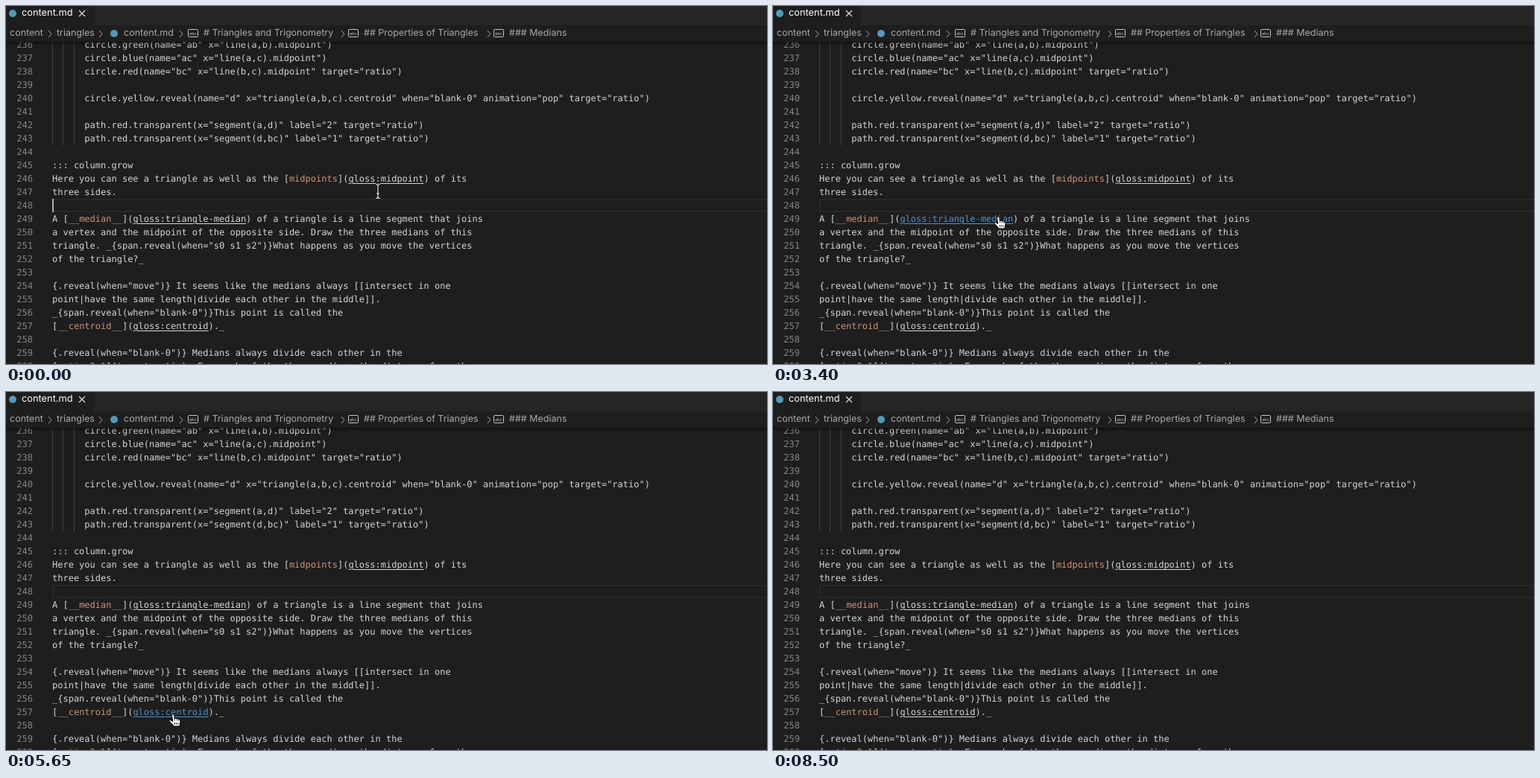
An HTML page for the animation above (8.92 s loop, 1021x481 px).

```html
<!DOCTYPE html>
<html lang="en">
<head>
<meta charset="utf-8">
<title>Glossary hover</title>
<style>
  html, body { margin: 0; width: 100%; height: 100%; overflow: hidden; background: #1e1e1e; }
  #stage { position: relative; width: 1021px; height: 481px; overflow: hidden; background: #1e1e1e;
    text-rendering: geometricPrecision; }
  #stage * { position: absolute; white-space: pre; }
  #stage span, #stage i, #stage u, #stage b { position: static; font-style: normal; font-weight: 400; }
  #tabs { left: 118px; top: 0; right: 0; height: 26px; background: #252526; }
  .ui { font: 12.5px/20px Inter, sans-serif; color: #a9a9a9; }
  .tab { color: #fff; font-size: 12.8px; }
  .dot { width: 10px; height: 10px; border-radius: 50%; background: #519aba; }
  #editor { left: 0; top: 48px; width: 1021px; height: 433px; overflow: hidden; }
  #shadow { inset: 0; box-shadow: #000 0 6px 6px -6px inset; }
  .code { font: 12px/18px "DejaVu Sans Mono", monospace; color: #d4d4d4; }
  .num { left: 0; width: 36px; text-align: right; color: #858585; }
  .line { left: 62px; }
  .guide { top: 0; width: 1px; height: 139px; background: #404040; }
  #active { left: 62px; top: 211px; width: 970px; height: 14px; border: 2px solid #282828; }
  #caret { left: 62px; top: 211px; width: 2px; height: 18px; background: #aeafad; }
  #stage i { color: #ce9178; }
  u { text-decoration-thickness: 1px; text-underline-offset: 2px; }
  .popup { box-sizing: border-box; height: 181px; background: #252526; border: 1px solid #454545; }
  #stage .popup > div { position: static; padding: 0 8px; }
  #stage .popup .head { font: 11.7px/26px Inter, sans-serif; color: #ccc; border-bottom: 1px solid #3f3f40; }
  #stage .popup .code { padding: 4px 8px; }
  .head span { color: #3794ff; }
  .popup b { color: #569cd6; }
  .popup .note { color: #6a9955; }
  svg { left: 0; top: 0; width: 1021px; height: 481px; }
</style>
</head>
<body>
<div id="stage">
  <div id="tabs"></div>
  <div id="editor"></div>
  <svg id="icons" fill="none" stroke="#a9a9a9"></svg>
  <div id="popups"></div>
  <svg id="pointer">
    <g id="beam">
      <path d="M-3 -8.5Q0 -8.5 0 -6V8Q0 10.5 -3 10.5M3 -8.5Q0 -8.5 0 -6V8Q0 10.5 3 10.5M-2 4H2"
        fill="none" stroke="#111" stroke-width="3"/>
      <path d="M-3 -8.5Q0 -8.5 0 -6V8Q0 10.5 -3 10.5M3 -8.5Q0 -8.5 0 -6V8Q0 10.5 3 10.5M-2 4H2"
        fill="none" stroke="#eee" stroke-width="1.2"/>
    </g>
    <g id="arrow">
      <path d="M0 0V14.5L3.3 11.4L5.6 16.7L8 15.7L5.8 10.5H10.4Z" fill="#000" stroke="#fff"/>
    </g>
    <g id="hand" stroke="#000" stroke-linejoin="round">
      <path d="M-1.5 1.2C-1.5 -.6 1.4 -.6 1.6 1.2L2.4 6C3 5 5 5 5.2 6.3C6 5.6 7.4 5.8 7.7 7C9 6.6 10 7.4 10 9C10 11 9 12.5 9 16H1C0 14 -2 12.5 -4.6 9.6C-5.4 8 -3.5 7 -2 8.5L-.3 9.8Z" fill="#fff"/>
      <path d="M2.4 11V14M4.6 11V14M6.8 11V14M2.4 6V8.5M5.2 6.5V8.5M7.7 7V9" fill="none" stroke-width=".8"/>
    </g>
  </svg>
</div>
<script>
const LOOP = 8920;
const ROW = 18;
const $ = id => document.getElementById(id);

function add(parent, className, html, style = {}) {
  const node = document.createElement('div');
  node.className = className;
  node.innerHTML = html;
  for (const key in style) node.style[key] = style[key] + 'px';
  parent.append(node);
  return node;
}

// Tab and breadcrumbs
const stage = $('stage');
const label = (text, left, centre, extra = '') =>
  stage.insertBefore(add(stage, 'ui ' + extra, text, { left, top: centre - 10 }), $('icons'));
const dot = (x, y) => stage.insertBefore(add(stage, 'dot', '', { left: x - 5, top: y - 5 }), $('icons'));

label('content.md', 21, 10, 'tab');
dot(9, 10);
dot(145, 37);
[['content', 5], ['triangles', 68], ['content.md', 158], ['# Triangles and Trigonometry', 265],
 ['## Properties of Triangles', 480], ['### Medians', 675]].forEach(([text, x]) => label(text, x, 37));

const chevrons = [57, 125, 233, 450, 646].map(x => `<path d="M${x} 33l4 4.5l-4 4.5"/>`);
const symbols = [251, 466, 661].map(x =>
  `<rect x="${x - 6.5}" y="31.5" width="13" height="10" rx="1" stroke="#c5c5c5"/>
   <text x="${x}" y="38.6" font-family="Inter, sans-serif" font-size="5.6" text-anchor="middle"
     fill="#c5c5c5" stroke="none">abc</text>`);
$('icons').innerHTML = chevrons.join('') + symbols.join('') +
  '<path d="M98 6l8 8M106 6l-8 8" stroke="#ddd" stroke-width="1.2"/>';

// Editor
const source = `      circle.green(name="ab" x="line(a,b).midpoint")
      circle.blue(name="ac" x="line(a,c).midpoint")
      circle.red(name="bc" x="line(b,c).midpoint" target="ratio")

      circle.yellow.reveal(name="d" x="triangle(a,b,c).centroid" when="blank-0" animation="pop" target="ratio")

      path.red.transparent(x="segment(a,d)" label="2" target="ratio")
      path.red.transparent(x="segment(d,bc)" label="1" target="ratio")

::: column.grow
Here you can see a triangle as well as the [midpoints](gloss:midpoint) of its
three sides.

A [__median__](gloss:triangle-median) of a triangle is a line segment that joins
a vertex and the midpoint of the opposite side. Draw the three medians of this
triangle. _{span.reveal(when="s0 s1 s2")}What happens as you move the vertices
of the triangle?_

{.reveal(when="move")} It seems like the medians always [[intersect in one
point|have the same length|divide each other in the middle]].
_{span.reveal(when="blank-0")}This point is called the
[__centroid__](gloss:centroid)._

{.reveal(when="blank-0")} Medians always divide each other in the
[ratio 2:1](target:ratio). For each of the three medians the distance from the`;

const editor = $('editor');
add(editor, '', '').id = 'active';
[62, 76, 91].forEach(left => add(editor, 'guide', '', { left }));
source.split('\n').forEach((text, i) => {
  const top = i * ROW - 5;
  add(editor, 'code num', 236 + i, { top });
  add(editor, 'code line', text.replace(/\[([^\[\]]+)\]\(([^)]+)\)/, '[<i>$1</i>](<u>$2</u>)'), { top });
});
const caret = add(editor, '', '');
caret.id = 'caret';
add(editor, '', '').id = 'shadow';

// Glossary popups: linked = time the link is lit, shown = time the popup is up
const links = editor.querySelectorAll('u');
const hovers = [
  { left: 459, top: 44, linked: [870, 2220], shown: [1150, 2340], text: `midpoint:
  title: Midpoint
  text: The __midpoint__ of a line segment is the point on the line segment that
    splits the segment in the middle, into two congruent parts. The __midpoint
    formula__ says that for endpoints \`(x_1, y_1)\` and \`(x_2,y_2)\`, the midpoint
    is \`((x_1 + x_2)/2, (y_1 + y_2)/2)\`.

quadrangle-bases:` },
  { left: 170, top: 98, linked: [3280, 4760], shown: [3740, 4880], text: `triangle-median:
  title: Medians of a triangle
  text: The __medians__ of a triangle are the line segments that connect each
    vertex to the midpoint of the opposite sides. The three medians of a
    triangle intersect in a single point called the __centroid__.
  link: /course/triangles/properties#medians

triangle-midsegment:` },
  { left: 170, top: 242, linked: [5590, 7400], shown: [6580, 7560], text: `centroid:
  title: Centroid
  text: The __centroid__ of a triangle is the point where its three medians
    intersect. It is also the “center of mass” of the triangle of uniform
    density.
  link: /course/triangles/properties#center-of-mass

# chaos:` }
];

function colour(line) {
  if (line.startsWith('#')) return `<span class="note">${line}</span>`;
  const [, indent, key, value] = line.match(/^(\s*)(?:([\w-]+)(?=:))?(.*)$/);
  return key ? `${indent}<b>${key}</b>:<i>${value.slice(1)}</i>` : `${indent}<i>${value}</i>`;
}

hovers.forEach((hover, i) => {
  const body = hover.text.split('\n').map(colour).join('\n');
  hover.popup = add($('popups'), 'popup',
    `<div class="head"><span>Follow link</span> (option + click)</div><div class="code">${body}</div>`,
    { left: hover.left, top: hover.top });
  hover.popup.style.width = 'max-content';
  hover.link = links[i];
});

// Timeline
const caretOn = [[0, 510], [990, 1500], [1980, 2460], [2950, 3400], [3900, 4410],
  [4900, 5400], [5820, 6300], [6800, 7300], [7800, 8300]];
const path = [[0, 499, 248], [60, 499, 248], [330, 615, 207], [700, 514, 231], [2140, 514, 231],
  [2710, 427, 279], [2930, 427, 279], [3380, 302, 283], [4620, 302, 283], [5530, 224, 433],
  [5650, 224, 433], [5820, 226, 433], [7300, 226, 433], [7850, 300, 415], [8010, 300, 415],
  [8500, 978, 490]];
const shapes = [[0, 'beam'], [870, 'hand'], [1170, 'arrow'], [1440, 'hand'], [2220, 'beam'],
  [3280, 'hand'], [4760, 'beam'], [5530, 'hand'], [7400, 'beam'], [8500, 'none']];

const within = (t, [from, to]) => t >= from && t < to;
const clamp = v => Math.max(0, Math.min(1, v));

function pointerAt(t) {
  const next = path.findIndex(p => p[0] > t);
  if (next < 0) return path[path.length - 1].slice(1);
  const [t0, x0, y0] = path[next - 1];
  const [t1, x1, y1] = path[next];
  const k = (t - t0) / (t1 - t0);
  const ease = k * k * (3 - 2 * k);
  return [x0 + (x1 - x0) * ease, y0 + (y1 - y0) * ease].map(Math.round);
}

function draw(t) {
  caret.style.visibility = caretOn.some(span => within(t, span)) ? 'visible' : 'hidden';
  for (const { popup, link, linked, shown } of hovers) {
    const open = within(t, shown);
    popup.style.opacity = open ? clamp((t - shown[0]) / 80) : 0;
    link.style.color = within(t, linked) ? '#4e94ce' : '';
    link.style.background = open ? 'rgba(38, 79, 120, .25)' : '';
  }
  const shape = shapes.filter(s => s[0] <= t).pop()[1];
  const [x, y] = pointerAt(t);
  for (const id of ['beam', 'arrow', 'hand']) {
    $(id).style.display = id === shape ? '' : 'none';
    $(id).setAttribute('transform', `translate(${x} ${y})`);
  }
}

const start = performance.now();
function tick() {
  draw((performance.now() - start) % LOOP);
  requestAnimationFrame(tick);
}
tick();
</script>
</body>
</html>
```
